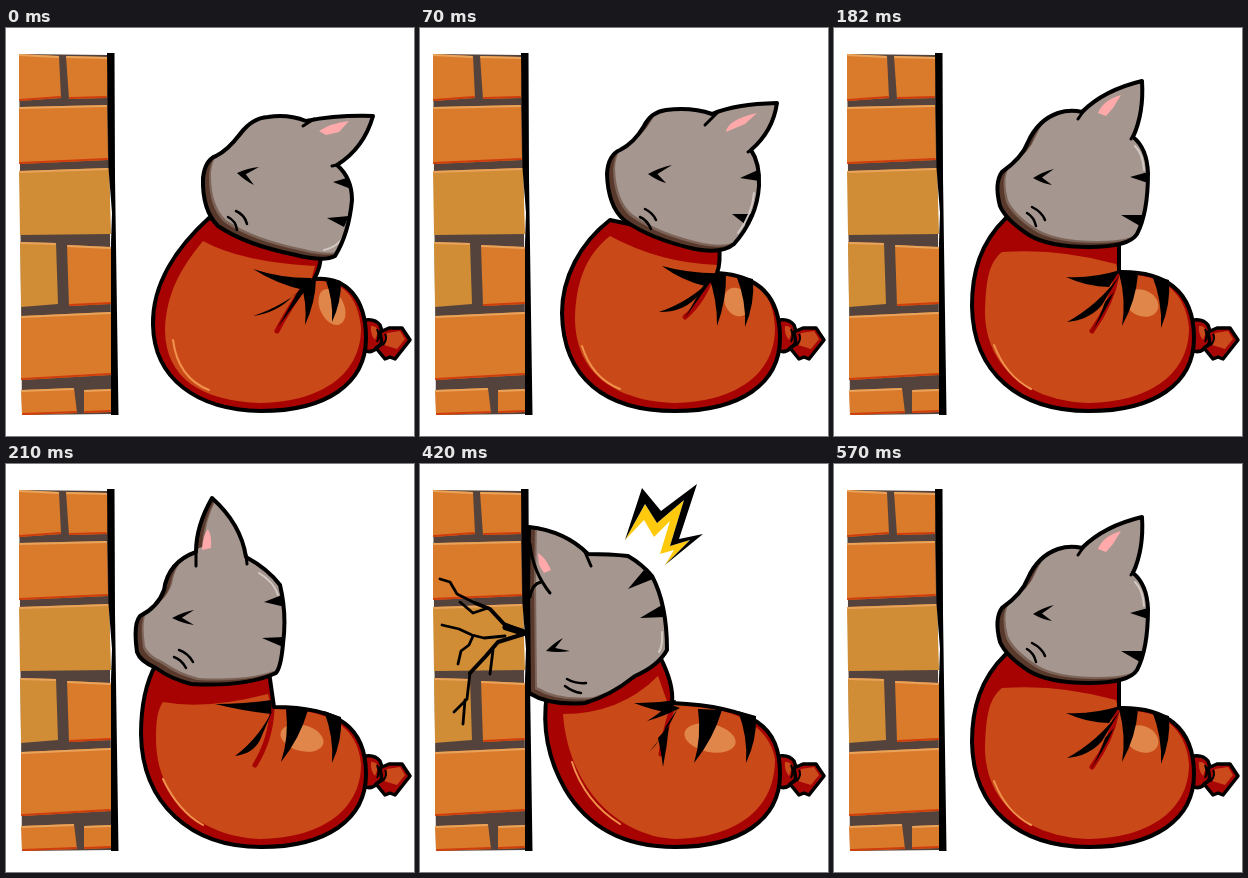
An HTML page that plays this animation: 408 px wide and 408 px high, repeating every 600 ms.

```html
<!DOCTYPE html>
<html lang="en">
<head>
<meta charset="utf-8">
<title>Head bump</title>
<style>
html, body { margin: 0; width: 100%; height: 100%; overflow: hidden; background: #fff; }
svg { display: block; width: 100vw; height: 100vh; }
.ink { fill: none; stroke: #000; stroke-width: 4; stroke-linejoin: round; stroke-linecap: round; }
.pose { visibility: hidden; animation: 600ms step-end infinite; }
.rest { animation-name: rest; }
.lean { animation-name: lean; }
.swing { animation-name: swing; }
.near { animation-name: near; }
.hit { animation-name: hit; }
@keyframes rest { 0% { visibility: visible } 11.6667%, 100% { visibility: hidden } }
@keyframes lean { 0% { visibility: hidden } 11.6667% { visibility: visible } 23.3333%, 100% { visibility: hidden } }
@keyframes swing { 0% { visibility: hidden } 23.3333% { visibility: visible } 35% { visibility: hidden } 95%, 100% { visibility: visible } }
@keyframes near { 0% { visibility: hidden } 35% { visibility: visible } 40% { visibility: hidden } 90% { visibility: visible } 95%, 100% { visibility: hidden } }
@keyframes hit { 0% { visibility: hidden } 40% { visibility: visible } 90%, 100% { visibility: hidden } }
</style>
</head>
<body>
<svg id="stage" viewBox="0 0 408 408">
  <path fill="#54433c" d="M13,26L102,27L106,386L16,387Z"/>
  <g id="bricks"></g>
  <path d="M101,25H108.5L109,150L112.5,387H105L105,215L106,185L102.500,140Z"/>
  <g id="tail" stroke="#000" stroke-width="3.500" stroke-linejoin="round" fill="#a80505">
    <path d="M355,293Q368,289 374,297L377,306Q377,316 371,320Q365,326 357,322Z"/>
    <path d="M374,304L383,300L396,300L404,312L389,331L384,329L379,331L370,320L376,316Z"/>
    <path stroke="none" fill="#cb4a1c" d="M365,298Q371,297 372,304L369,312Q364,306 365,298ZM381,305L394,303L399,311L391,321L378,317Z"/>
    <path fill="none" stroke-width="2" d="M379,306Q382,311 377,317M371,301Q374,308 371,314"/>
  </g>
</svg>
<script>
const NS = 'http://www.w3.org/2000/svg';
const stage = document.getElementById('stage');

function add(parent, tag, attrs) {
  const node = document.createElementNS(NS, tag);
  for (const key in attrs) node.setAttribute(key, attrs[key]);
  return parent.appendChild(node);
}
const fill = (g, d, color) => add(g, 'path', { d, fill: color });
const line = (g, d, color, width) =>
  add(g, 'path', { d, class: 'ink', style: `stroke:${color};stroke-width:${width}` });

// Corners run clockwise from the top left.
const orange = '#da7b2b', tan = '#d08d36';
const bricks = [
  [orange, 13, 26, 53, 28, 55, 70, 13, 73],
  [orange, 60, 28, 102, 29, 101, 70, 63, 71],
  [orange, 13, 79, 101, 77, 102, 132, 13, 136],
  [tan, 13, 143, 103, 140, 105, 206, 14, 207],
  [tan, 14, 214, 50, 215, 52, 276, 15, 279],
  [orange, 61, 217, 105, 219, 105, 276, 63, 278],
  [orange, 15, 288, 105, 284, 105, 347, 15, 352],
  [orange, 15, 362, 68, 360, 71, 385, 16, 387],
  [orange, 78, 362, 105, 361, 105, 384, 78, 385]
];
const wall = document.getElementById('bricks');
for (const [color, ax, ay, bx, by, cx, cy, dx, dy] of bricks) {
  fill(wall, `M${ax},${ay}L${bx},${by}L${cx},${cy}L${dx},${dy}Z`, color);
  line(wall, `M${ax + 1},${ay + 1}L${bx - 1},${by + 1}`, '#e9a35a', 2);
  if (color === orange) line(wall, `M${dx + 1},${dy - 1}L${cx - 1},${cy - 1}`, '#cf3d0c', 2);
}

// A pointed stripe from base a-b to its tip, bowed sideways by bend.
function spike([tx, ty, ax, ay, bx, by, bend = 0]) {
  const mx = (ax + bx) / 2 - tx, my = (ay + by) / 2 - ty;
  const len = Math.hypot(mx, my);
  const ox = -my / len * bend, oy = mx / len * bend;
  const mid = (x, y) => `${(x + tx) / 2 + ox},${(y + ty) / 2 + oy}`;
  return `M${ax},${ay}Q${mid(ax, ay)} ${tx},${ty}Q${mid(bx, by)} ${bx},${by}Z`;
}

// A shut eye: a chevron with thin ends.
function eye([px, py, ax, ay, bx, by]) {
  const ix = px + ((ax + bx) / 2 - px) * 0.45;
  const iy = py + ((ay + by) / 2 - py) * 0.45;
  return `M${ax},${ay}Q${(px + ax) / 2},${(py + ay) / 2 - 2} ${px},${py}` +
    `Q${(px + bx) / 2},${(py + by) / 2 + 2} ${bx},${by}L${ix},${iy}Z`;
}

const poses = {
  rest: {
    body: 'M203,190C172,218 146,255 147,297C148,350 190,382 255,383C320,383 360,356 360,310C360,270 340,248 308,251Q315,240 315,224Z',
    skin: 'M197,213Q235,234 309,238L305,253Q350,250 355,300C355,350 310,374 255,375C195,373 160,350 159,303C160,265 175,240 197,213Z',
    shine: 'M167,312Q172,350 203,362',
    belly: [326, 279, 12, 19, -25],
    crease: 'M300,256Q283,280 271,303',
    stripes: [[247, 241, 306, 250, 298, 262, 5], [247, 288, 287, 268, 307, 252, 8],
      [272, 299, 293, 262, 304, 256, 0], [299, 297, 294, 252, 310, 251, 5], [326, 294, 319, 250, 335, 253, 5]],
    head: 'M367,88Q358,120 331,137Q346,150 346,172Q343,205 329,228Q318,234 290,227Q240,217 212,198Q196,182 197,150Q199,132 210,128Q222,122 234,106Q246,90 262,89Q282,86 300,93Q330,87 367,88Z',
    fold: 'M308,91L297,98M331,137L326,138',
    pink: 'M313,103Q325,95 343,93L333,104L320,107Z',
    glint: 'M340,203Q335,218 318,222',
    eye: [231, 145, 253, 139, 248, 157],
    whiskers: 'M230,183Q239,187 241,196M222,189Q230,193 231,202',
    cheeks: [[327, 154, 344, 149, 345, 161], [321, 190, 343, 188, 338, 199]]
  },
  lean: {
    body: 'M190,192C160,215 142,250 142,285C143,350 185,383 255,383C320,383 360,356 360,310C360,265 335,247 297,245Q301,235 299,215Z',
    skin: 'M190,208Q240,235 297,237L300,247Q352,245 355,300C355,350 310,374 255,375C195,373 155,345 155,290C156,255 165,228 190,208Z',
    shine: 'M162,318Q172,350 200,361',
    belly: [317, 274, 12, 15, -30],
    crease: 'M292,248Q282,275 265,289',
    stripes: [[242, 238, 305, 245, 285, 258, 5], [239, 284, 275, 271, 294, 249, 8],
      [265, 290, 283, 258, 294, 249, 0], [297, 298, 288, 246, 306, 246, 5], [325, 299, 316, 247, 333, 251, 6]],
    head: 'M357,75Q353,103 331,122Q340,135 339,158Q337,190 314,216Q302,226 275,221Q230,211 204,192Q188,178 187,146Q188,127 200,122Q214,115 224,98Q231,84 246,82Q272,79 292,86Q315,76 357,75Z',
    fold: 'M299,83L285,97M331,122L328,124',
    pink: 'M306,104Q307,92 337,85L325,96Z',
    glint: 'M334,165Q332,187 318,205',
    eye: [228, 146, 252, 137, 246, 155],
    whiskers: 'M225,181Q233,185 236,192M220,189Q227,192 231,201',
    cheeks: [[320, 150, 338, 142, 339, 153], [312, 186, 334, 186, 326, 197]]
  },
  swing: {
    body: 'M172,190C146,215 138,245 138,278C139,345 185,383 255,383C320,383 360,356 360,310C360,262 330,243 285,244L285,210Z',
    skin: 'M168,224Q225,220 282,236L285,246Q350,245 355,300C355,350 310,374 255,375C195,373 152,340 151,285C152,250 155,235 168,224Z',
    shine: 'M160,317Q172,348 197,361',
    belly: [308, 275, 17, 13, 25],
    crease: 'M283,247Q278,275 258,303',
    stripes: [[232, 249, 286, 242, 275, 259, 5], [233, 294, 268, 277, 286, 247, 8],
      [257, 305, 271, 274, 280, 264, 2], [288, 298, 285, 245, 304, 246, 6], [327, 300, 318, 247, 335, 252, 6]],
    head: 'M308,53Q310,85 299,109Q313,120 314,145Q314,185 303,206Q295,219 255,219Q215,219 195,207Q172,192 166,178Q160,155 168,144Q188,130 194,114Q204,92 224,85Q236,81 248,84Q270,62 308,53Z',
    fold: 'M251,81L244,91M300,106L297,111',
    pink: 'M264,85Q269,72 287,67L279,80L272,88Z',
    glint: 'M301,118Q309,126 310,142',
    eye: [199, 150, 220, 141, 218, 157],
    whiskers: 'M193,185Q200,189 202,198M198,179Q208,184 211,192',
    cheeks: [[296, 149, 314, 144, 314, 155], [287, 187, 310, 187, 306, 198]]
  },
  near: {
    body: 'M150,200C138,222 135,245 135,270C136,340 185,383 255,383C320,383 360,356 360,310C360,265 335,243 268,243L263,208Z',
    skin: 'M157,238Q200,246 262,230L266,245Q350,243 355,300C355,350 310,374 255,375C195,373 150,335 150,275C150,255 152,245 157,238Z',
    shine: 'M157,315Q172,347 197,361',
    belly: [296, 274, 22, 13, 15],
    crease: 'M266,245Q265,275 249,301',
    stripes: [[209, 240, 266, 236, 265, 250, 2], [229, 292, 254, 276, 268, 243, 8],
      [275, 298, 280, 245, 302, 246, 6], [326, 299, 318, 247, 335, 253, 6]],
    head: 'M206,34Q235,60 240,93Q262,105 274,121Q281,150 277,180Q275,203 270,209Q240,223 185,220Q165,215 150,204Q134,197 131,188Q127,160 134,152Q152,143 158,126Q162,98 190,88Q190,62 206,34Z',
    fold: 'M190,87L190,102M240,91L241,100',
    pink: 'M196,86Q197,70 202,65Q206,72 205,84Z',
    glint: 'M253,109Q268,118 272,131',
    eye: [166, 154, 188, 146, 188, 161],
    whiskers: 'M173,186Q182,189 187,198M168,193Q176,196 180,204',
    cheeks: [[258, 138, 276, 131, 279, 143], [256, 174, 278, 173, 277, 183]]
  },
  hit: {
    body: 'M127,230C122,262 128,295 145,325C168,364 205,383 255,383C320,383 360,356 360,310C360,262 335,243 252,239Q254,220 240,193Z',
    skin: 'M143,250Q200,250 238,212L248,240Q345,242 355,295C355,350 310,374 255,375C195,372 148,320 143,250Z',
    shine: 'M152,298Q165,338 200,360',
    belly: [290, 274, 26, 14, 12],
    crease: 'M252,245Q244,270 241,290',
    stripes: [[214, 239, 256, 236, 250, 249, 2], [227, 257, 249, 240, 260, 244, 2],
      [229, 288, 246, 262, 258, 244, 4], [243, 303, 238, 274, 249, 262, 1],
      [274, 299, 278, 245, 302, 246, 6], [326, 299, 318, 247, 336, 252, 6]],
    head: 'M109,63Q145,67 168,90Q190,90 208,92Q222,100 232,112Q247,140 247,186Q238,202 215,212Q190,232 165,239Q130,242 109,229L108,125Z',
    fold: 'M110,80Q113,108 130,129M110,133Q112,120 121,118M165,88L171,102',
    pink: 'M119,101L118,89Q126,94 131,106L124,109Z',
    glint: 'M242,168Q243,181 239,188',
    eye: [126, 187, 143, 174, 150, 187],
    whiskers: 'M147,215Q156,220 166,219M145,222Q153,228 161,229',
    cheeks: [[208, 125, 224, 106, 233, 115], [220, 154, 242, 141, 245, 153]]
  }
};

function drawPose(name, p) {
  const g = add(stage, 'g', { class: `pose ${name}` });
  const clip = add(g, 'clipPath', { id: `${name}-head` });
  add(clip, 'path', { d: p.head });

  fill(g, p.body, '#a80303');
  fill(g, p.skin, '#c94a18');
  line(g, p.shine, '#f0914c', 2);
  const [cx, cy, rx, ry, turn] = p.belly;
  add(g, 'ellipse', { cx, cy, rx, ry, fill: '#e0864a', transform: `rotate(${turn} ${cx} ${cy})` });
  line(g, p.crease, '#a80303', 5);
  p.stripes.forEach(s => fill(g, spike(s), '#000'));
  line(g, p.body, '#000', 4);

  fill(g, p.head, '#58392c');
  const face = add(g, 'g', { 'clip-path': `url(#${name}-head)` });
  fill(face, p.head, '#7d6458').setAttribute('transform', 'translate(6 -4)');
  fill(face, p.head, '#a5968f').setAttribute('transform', 'translate(8 -6)');
  p.cheeks.forEach(s => fill(face, spike(s), '#000'));
  fill(g, p.pink, '#ffa9ab');
  line(g, p.glint, '#d3c9c4', 2);
  fill(g, eye(p.eye), '#000');
  line(g, p.whiskers, '#000', 2.5);
  line(g, p.fold, '#000', 3);
  line(g, p.head, '#000', 4);
  return g;
}

const drawn = {};
for (const name in poses) drawn[name] = drawPose(name, poses[name]);

// Impact: wall cracks and a spark.
const hit = drawn.hit;
line(hit, 'M104,168L84,160L70,145L55,139M104,170L78,178L65,193L50,209', '#000', 4);
line(hit, 'M102,168L86,163', '#000', 7);
line(hit, 'M55,139L37,130L30,118L20,115M68,144L53,149L40,138M85,172L64,174L52,171L39,165L22,161' +
  'M53,172L49,181L41,187L38,200M73,186L70,210M50,209L47,235L34,248M45,236L43,260', '#000', 2.8);
fill(hit, 'M205,76L225,40L237,59L264,36L250,82L270,76L245,101L254,86L240,90L250,57L234,73L224,56Z', '#ffc90e');
fill(hit, 'M205,76L222,24L241,47L277,20L259,75L283,70L245,101L270,76L250,82L264,36L237,59L225,40Z', '#000');
</script>
</body>
</html>
```
